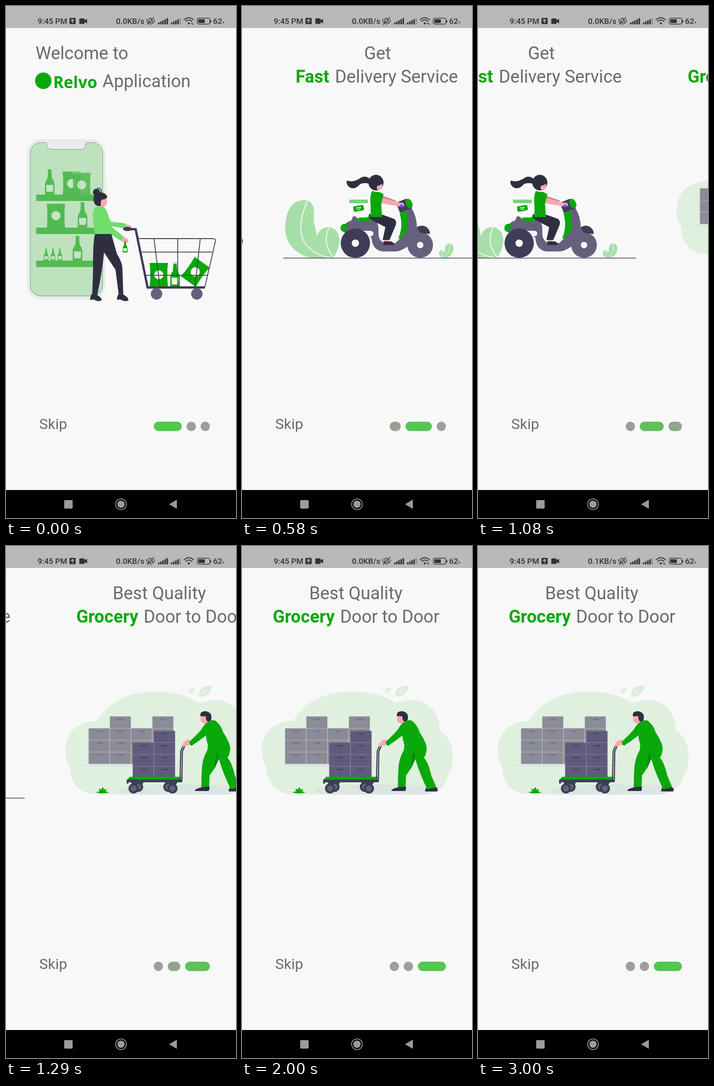
An HTML page for the animation above (3080 ms loop, 502 px wide and 1116 px high).

```html
<!DOCTYPE html>
<html lang="en">
<head>
<meta charset="utf-8">
<title>Onboarding</title>
<style>
html, body { margin: 0; width: 100%; height: 100%; overflow: hidden; background: #f8f8f9; }
svg { display: block; width: 502px; height: 1116px; }
text { font-family: Roboto, sans-serif; white-space: pre; }
.title { font-size: 38.35px; fill: #6b6b6b; }
.title .key { font-weight: 700; fill: #0aa80a; }
.bar { font-size: 17.3px; font-weight: 500; fill: #333; }
.line { fill: none; stroke: #3f3d56; stroke-width: 1.8; }
.vein { fill: none; stroke: #f8f8f9; stroke-width: 2; }
.green { fill: #0aa80a; }
.shelf { fill: #53ba53; color: #c3e5c3; }
.fresh { fill: #0aa80a; color: #f8f8f9; }
.dark { fill: #2f2e41; }
.slate { fill: #3f3d56; }
.mauve { fill: #65617d; }
.skin { fill: #f8a9b0; }
</style>
</head>
<body>
<svg viewBox="0 0 502 1116">
<defs>
  <g id="bottle">
    <path d="M-4 0H4V4L3.5 5 5 20Q10.5 27 10.5 34V53Q10.5 55 8.5 55H-8.5Q-10.5 55-10.5 53V34Q-10.5 27-5 20L-3.5 5-4 4Z"/>
    <path fill="currentColor" d="M-8 34H8L7 49H-7Z"/>
  </g>
  <g id="bag">
    <path d="M-20-26H20Q17 0 20 26H-20Q-17 0-20-26Z"/>
    <circle r="10" fill="currentColor"/>
  </g>
  <path id="shoe" d="M187 628Q183 634 184 641Q190 638 196 642Q204 645 209 641Q209 636 198 629Z"/>
  <g id="wheel"><circle r="11" class="slate"/><circle r="6.5" class="mauve"/></g>
</defs>
<rect width="502" height="1116" fill="#f8f8f9"/>

<g id="pages">
  <!-- Shopping -->
  <g>
    <text class="title" x="64.5" y="116">Welcome to</text>
    <circle class="green" cx="81.5" cy="163" r="18"/>
    <text class="green" x="103" y="179" style="font:700 35px 'Open Sans',sans-serif">Relvo</text>
    <text class="title" x="210.5" y="177">Application</text>

    <path d="M215 374h3.500v38h-3.500z" fill="#e9e9ea"/>
    <rect x="45" y="290" width="172" height="350" rx="31" fill="#ebebec"/>
    <path d="M76 297.500H86Q89 297.500 89 302Q89 312.500 100 312.500H163Q174 312.500 174 302Q174 297.500 177 297.500H188A23 23 0 0 1 211 320.500V609A23 23 0 0 1 188 632H76A23 23 0 0 1 53 609V320.500A23 23 0 0 1 76 297.500Z" fill="#bde2bd" stroke="#5da568"/>
    <g class="shelf">
      <path d="M66 411H197v14H66zM66 483H197v14H66zM66 555H197v14H66z"/>
      <use href="#bottle" x="95.500" y="356"/>
      <use href="#bottle" x="167" y="428"/>
      <use href="#bottle" x="156" y="501"/>
      <use href="#bottle" transform="translate(87.500 529)scale(.48)"/>
      <use href="#bottle" transform="translate(102.500 529)scale(.48)"/>
      <use href="#bottle" transform="translate(117.500 529)scale(.48)"/>
      <use href="#bag" x="143.500" y="387"/>
      <use href="#bag" x="165" y="390" opacity=".88"/>
      <path d="M146 362.500h39v2h-39z" fill="#9dd69d"/>
      <use href="#bag" x="109" y="457"/>
    </g>

    <path class="skin" d="M205 430h9l-1 14-11-3zM259 476Q270 475 275 482L267 486 258 484ZM256 503Q266 506 268 513Q264 519 257 515L250 511Z"/>
    <circle class="dark" cx="197.500" cy="406" r="7.800"/>
    <path d="M199 397Q209 396 208 408" fill="none" stroke="#2f2e41" stroke-width="1.800"/>
    <path class="dark" d="M206 406Q220 408 221 417Q219 422 211 424L207 435Q200 438 195 433Q190 427 191 416Q196 406 206 406Z"/>
    <path class="skin" d="M212 422Q218 421 220 417Q222 430 217 436Q212 439 207 433L207 426Q209 421 212 422Z"/>
    <path fill="#70dd6c" d="M196 438Q187 446 190 467L194 498H229L251 512 257 503 229 480 260 485 262 474 229 470Q223 460 221 449Q217 440 210 437Z"/>
    <path class="dark" d="M194 497H230L242 540Q254 560 254 572L256 629H246L239 575 214 537Q210 580 199 630H188Q190 590 190 560Q190 515 194 497Z"/>
    <use href="#shoe" class="dark"/><use href="#shoe" class="dark" x="58.500"/>

    <g class="fresh">
      <use href="#bottle" transform="translate(260 513)scale(.5 .44)"/>
      <use href="#bag" x="333.500" y="586"/>
      <use href="#bag" transform="translate(413 579.500)rotate(35.500)"/>
      <use href="#bottle" x="369" y="558"/>
      <path d="M364.500 558h9v4h-9z" fill="#d5d5d0"/>
    </g>
    <path class="line" d="M289 507H451Q458 507 457 513L434 613M295 536.300H450M304 586.800H441M323 507L336 612M374.700 507V612M424 507L412.500 612"/>
    <path class="line" style="stroke-width:5" d="M268 486.500H283L309 613.500H434"/>
    <ellipse class="slate" cx="265" cy="486" rx="9.500" ry="4.500"/>
    <circle class="mauve" cx="328.500" cy="627.500" r="12.500"/>
    <circle class="mauve" cx="416.500" cy="627.500" r="12.500"/>
  </g>

  <!-- Scooter -->
  <g transform="translate(492)">
    <text class="title" x="230.500" y="116">Get</text>
    <text class="title key" x="81" y="167"><tspan class="key">Fast</tspan></text>
    <text class="title" x="167" y="167">Delivery Service</text>

    <g fill="#a7dfa8">
      <path d="M112 549Q59 533 58 482Q61 424 100 423Q124 425 121 456Q120 470 125 488Q128 497 127 503Q133 483 152 482Q176 484 177 512Q174 535 163 549Z"/>
      <path d="M403 549Q391 545 395 535Q400 528 405 536Q408 540 407 527Q410 516 418 517Q428 521 425 534Q422 545 410 549Z"/>
    </g>
    <path class="vein" d="M107 424Q80 485 103 519Q123 544 158 548.500M154 482Q138 520 165 548.500"/>
    <path class="vein" style="stroke-width:1" d="M417 517Q419 540 404 548M400 532Q403 540 400 547"/>

    <circle class="mauve" cx="353" cy="521" r="28"/><circle cx="353" cy="521" r="7" fill="#f8f8f9"/>
    <path class="slate" d="M341 486Q357 472 370 485Q375 491 374 497L355 495Z"/>
    <path class="mauve" d="M184 492Q186 471 202 468 205 464 206 459Q212 456 218 465H250Q262 470 262 486V498Q264 515 278 517H298Q316 505 322 470L312 452 334 440Q346 460 346 484Q352 490 352 500L345 500Q340 515 324 525Q310 535 298 535H272Q250 533 247 508 247 502 240 502L225 505Z"/>
    <rect x="222" y="490" width="29" height="12" rx="6" fill="#f8f8f9"/>
    <circle class="slate" cx="211.500" cy="517" r="32"/><circle cx="211.500" cy="517" r="8" fill="#f8f8f9"/>
    <path class="green" d="M192 475Q180 473 179 484Q180 493 188 492Q194 485 193 476ZM214 469L221 459H248L246 469ZM308 452L321 446Q330 471 323 490Q317 504 305 507Q317 480 308 452Z"/>
    <path d="M198 429H238V461H218Q210 456 206 458Q202 462 200 460Z" fill="#fff"/>
    <rect x="198" y="422" width="41" height="8" rx="2" fill="#7dd07d"/>
    <g transform="translate(218.500 441)rotate(-10)">
      <rect class="green" x="-11.500" y="-6" width="23" height="12" rx="3"/>
      <path d="M-6-1.500H6M-4 2H4" stroke="#fff" stroke-width="1.500"/>
    </g>
    <path class="slate" d="M300 429L322 420 335 441 309 451Z"/>
    <ellipse class="green" cx="328.500" cy="430.500" rx="7" ry="11" transform="rotate(-25 328.500 430.500)"/>

    <path class="skin" d="M274 507h10v8h-10z"/>
    <path class="dark" d="M273 513H289Q297 516 296 521H273ZM241 454H268L296 464Q303 469 299 479L286 510H271L277 482 250 468Q239 462 241 454Z"/>
    <path fill="#cb868c" d="M272 414L300 424 298 430 270 420Z"/>
    <path class="skin" d="M270 418L310 429Q319 427 318 436L308 437 268 430Z"/>
    <circle cx="312" cy="436" r="3.500" fill="#6c4bff"/>
    <path class="green" d="M248 403Q256 406 263 405L273 410 268 431Q268 437 270 460H244Q246 440 244 425Q244 410 248 403Z"/>
    <path class="dark" d="M243 377Q236 370 226 373Q212 382 205 382Q196 382 193 380Q190 392 203 397Q213 399 222 388Q232 384 243 388Z"/>
    <ellipse class="dark" cx="256.500" cy="385" rx="16.500" ry="17"/>
    <path class="skin" d="M259 392Q266 391 270 387Q272 397 265 402Q260 402 258 397Z"/>
    <path class="line" style="stroke-width:1.400" d="M54 549.500H466.500"/>
  </g>

  <!-- Warehouse -->
  <g transform="translate(1004)">
    <text class="title" x="146.500" y="116">Best Quality</text>
    <text class="title"><tspan class="key" x="67" y="167">Grocery</tspan></text>
    <text class="title" x="214" y="167">Door to Door</text>

    <path fill="#e0f0df" d="M112 381Q150 317 242 317Q302 318 336 343Q360 332 385 337Q430 350 432 402Q460 420 460 462Q458 490 450 497Q445 535 400 542H115Q55 540 53 482Q43 465 42.500 442Q48 384 112 381Z"/>
    <path fill="#d9e6e1" d="M50 478Q193 471 336 478Q193 485 50 478ZM159 532Q175 521 290 520Q410 520 432 526Q425 537 400 542H195Q160 540 159 532Z"/>
    <path fill="#d8ecd9" d="M336 328Q331 305 362 304Q362 328 336 328ZM312 321Q311 309 325 309Q322 321 312 321Z"/>
    <path class="vein" style="stroke-width:1" d="M336 328L358 308M342 322V311M347 317V307M342 322L354 321M349 315L359 314M313 320L322 311"/>
    <g id="boxes"></g>

    <path class="slate" d="M186 515h28l-6 10h-14zM260 515h28l-7 10h-14zM177 509H298V515H181V518H177Z"/>
    <use href="#wheel" x="202" y="525"/><use href="#wheel" x="192" y="528.500"/>
    <use href="#wheel" x="268" y="525"/><use href="#wheel" x="277" y="528.500"/>
    <path class="green" d="M184 503H296L295 509H178Z"/>
    <path class="line" style="stroke-width:2.500" d="M293.500 511L295 447 302 431M297.500 513L298.500 448 306 431"/>
    <path class="green" d="M109.500 537Q124 531 139 537Q124 541.500 109.500 537ZM123 536Q115 534 117 529Q123 530 124 535Q120 528 125 526Q129 529 126 535Q128 529 133 530Q132 536 125 536Z"/>

    <path class="skin" d="M298 433Q305 421 313 422L318 431Q308 437 299 437ZM339 371H351L357 383 350 387Q338 387 338 376Z"/>
    <path class="dark" d="M338 371Q336 360 350 360Q363 363 362 374Q362 382 356 383Q349 382 350 371Z"/>
    <path class="dark" d="M340 524L357 523Q359 530 356 534H326Q326 529 340 526ZM402 527L423 525Q429 530 426 535H400Q399 531 402 527Z"/>
    <path class="green" d="M352 385Q362 377 371 381Q384 392 387 405Q402 428 403 440Q403 452 397 462Q406 470 413 500L424 526 404 530Q385 490 378 463Q370 485 358 500L357 524 340 526Q340 505 341 490Q341 465 353 445Q354 440 354 432Q350 420 350 413Q335 425 319 435L313 427Q330 412 340 400Q347 388 352 385Z"/>
    <path fill="#078e07" d="M379 463L368 487Q369 461 375 447ZM314 430L322 431 320 435 316 434Z"/>
  </g>
</g>

<text x="72.500" y="922" font-size="32" fill="#6b6b6b">Skip</text>
<g id="dots"></g>

<!-- Status bar -->
<rect width="502" height="48" fill="#b9b9b9"/>
<g class="bar">
  <text x="69" y="39">9:45 PM</text>
  <text x="240" y="39" id="speed">0.0KB/s</text>
  <text x="452" y="39">62</text><text x="471" y="38" font-size="8">%</text>
  <rect x="138.500" y="26" width="13.500" height="13.500" rx="1.500"/>
  <path d="M145.200 37V30M142 32.500L145.200 29.200 148.500 32.500" fill="none" stroke="#b9b9b9" stroke-width="1.800"/>
  <path d="M161.500 27H170Q171.500 27 171.500 28.500V31L177 28V38L171.500 35V37.500Q171.500 39 170 39H161.500Q160 39 160 37.500V28.500Q160 27 161.500 27Z"/>
  <g id="signal"></g>
  <path d="M399 41L396 37Q399 34.500 402 37Z"/>
  <path id="arrows" d="M405.500 36l2 2.500h-4zM407.500 41l2-2.500h-4z"/>
  <rect x="420" y="29" width="14" height="8" rx="1"/><rect x="446" y="31" width="2" height="5" rx="1"/>
  <g fill="none" stroke="#333" stroke-width="1.800">
    <path d="M388 30.500Q399 20.500 410 30.500M391.500 34Q399 27 406.500 34"/>
    <rect x="417.500" y="26.500" width="27.500" height="13" rx="3.500" stroke-width="1.500"/>
    <path stroke-width="1.500" d="M309.500 37H321L319 34V30Q318 26.500 315 26.500Q312 26.500 311.500 30V34ZM314 40H317M308 41L323 24M308 28Q306 32 308 35M322.500 29Q325 32 322.500 36"/>
  </g>
</g>

<!-- Navigation bar -->
<rect y="1055" width="502" height="61"/>
<g fill="#9b9b9b">
  <rect x="127" y="1077" width="18.500" height="18.500" rx="2.500"/>
  <circle cx="251" cy="1086" r="8"/>
  <circle cx="251" cy="1086" r="11.700" fill="none" stroke="#9b9b9b" stroke-width="1.800"/>
  <path d="M356 1086L373 1076V1096Z"/>
</g>
</svg>
<script>
const LOOP = 3080, PAGE = 502;
const $ = id => document.getElementById(id);
const rect = (x, y, w, h, fill) => `<rect x="${x}" y="${y}" width="${w}" height="${h}" fill="${fill}"/>`;

// Stacks of boxes: [left, top row, fill, handle, divider], all standing on row 0
const box = (x, y, fill, handle) => rect(x, y, 45.5, 25.3, fill) + rect(x + 17, y + 5, 13, 2.5, handle);
const stack = (x, base, rows, fill, handle, divider) => {
  let out = rect(x, base - rows * 26, 46.3, rows * 26, divider);
  for (let i = 1; i <= rows; i++) out += box(x, base - i * 26, fill, handle);
  return out;
};
$('boxes').innerHTML =
  [3, 4, 3, 4].map((rows, i) => stack(94 + i * 46.4, 475.5, rows, '#8a8b97', '#73728a', '#c9d5cf')).join('') +
  [3, 4].map((rows, i) => stack(190.3 + i * 46.4, 507, rows, '#605a7b', '#47425f', '#9a95ae')).join('');

// Two signal meters; the second has its last bar dimmed
$('signal').innerHTML = [332, 360].map((x, m) =>
  [0, 1, 2, 3, 4].map(i => rect(x + i * 4.6, 36 - i * 2.4, 3.2, 4 + i * 2.4, m && i > 3 ? '#8d8d8d' : '#333')).join('')).join('');

$('dots').innerHTML = rect(0, 906, 20.5, 20.5, '').replace('/>', ' rx="10.25"/>').repeat(3);
const dots = [...$('dots').children];

// Accelerating drag, then an overdamped spring to the next page
function swipe(ms) {
  if (ms <= 0) return 0;
  if (ms < 280) return 140 * (ms / 280) ** 3;
  const s = (ms - 280) / 1000;
  return PAGE - 496 * Math.exp(-9.08 * s) + 134 * Math.exp(-22 * s);
}

const mix = (a, b, k) => Math.round(a + (b - a) * k);

function draw(now) {
  const t = now % LOOP;
  const scroll = swipe(t - 40) + swipe(t - 821);
  $('pages').setAttribute('transform', `translate(${-scroll})`);

  let x = 322.3;
  dots.forEach((dot, i) => {
    const k = Math.max(0, 1 - Math.abs(scroll / PAGE - i));
    const width = 20.5 + 41 * k;
    dot.setAttribute('x', x);
    dot.setAttribute('width', width);
    dot.setAttribute('fill', `rgb(${mix(158, 80, k)},${mix(158, 201, k)},${mix(156, 76, k)})`);
    x += width + 10.2;
  });

  $('speed').textContent = t < 2540 ? '0.0KB/s' : '0.1KB/s';
  $('arrows').style.opacity = t > 1000 && t < 1670 ? 0 : 1;
  requestAnimationFrame(draw);
}
requestAnimationFrame(draw);
</script>
</body>
</html>
```
